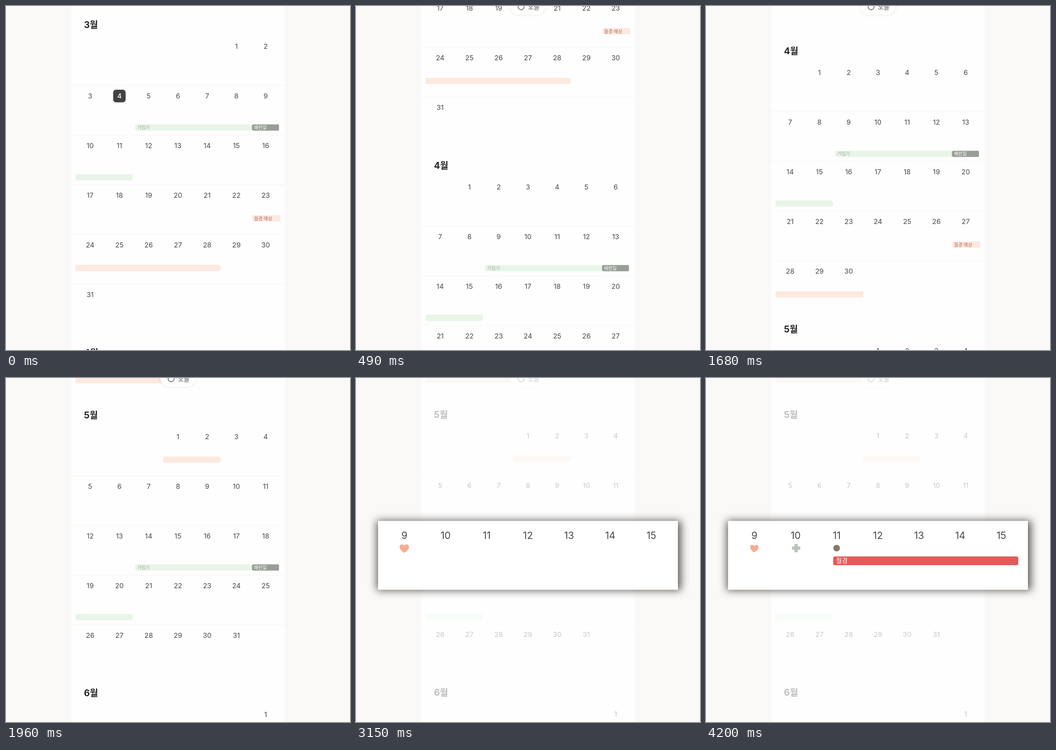
Animation of 748 by 748 pixels, one loop 5.25 s. Source, as an HTML page with a canvas:

```html
<!DOCTYPE html>
<html lang="ko">
<head>
<meta charset="utf-8">
<title>달력</title>
<style>
  html, body { margin: 0; width: 100%; height: 100%; overflow: hidden; background: #faf9f7; }
  canvas { display: block; }
</style>
</head>
<body>
<canvas id="stage" width="748" height="748"></canvas>
<script>
const SIZE = 748, LOOP = 5250, STEP = 70;
const CARD = { left: 142, width: 464 };
const COL0 = 183, COL = 63.6, ROW = 108, CENTER = 373.8;
const FONT = "Inter, 'Noto Sans CJK KR', 'Noto Sans CJK', sans-serif";
const GREEN = '#e8f5e8', PEACH = '#fde9df';

const ctx = document.getElementById('stage').getContext('2d');

// Bars hold day ranges; "open" sides run on into a neighbouring month.
const months = [
  { name: '3월', first: 5, days: 31, today: 4, fertile: [5, 11], ovulation: 9, periods: [{ from: 23, to: 28, label: true }] },
  { name: '4월', first: 1, days: 30, fertile: [9, 15], ovulation: 13, periods: [{ from: 27, to: 30, label: true, openEnd: true }] },
  { name: '5월', first: 3, days: 31, fertile: [14, 20], ovulation: 18, periods: [{ from: 1, to: 2, openStart: true }] },
  { name: '6월', first: 6, days: 30, periods: [] }
];
let nextTop = 41;
for (const m of months) {
  m.top = nextTop;
  m.weeks = Math.ceil((m.first + m.days) / 7);
  nextTop += 46.5 + (m.weeks - 1) * ROW + 126;
}

const clamp = v => Math.max(0, Math.min(1, v));
const mix = (a, b, p) => a + (b - a) * p;

// cubic-bezier(.42, 0, .58, 1)
function easeInOut(x) {
  if (x <= 0 || x >= 1) return clamp(x);
  let lo = 0, hi = 1;
  for (let i = 0; i < 24; i++) {
    const s = (lo + hi) / 2, r = 1 - s;
    if (3 * r * r * s * 0.42 + 3 * r * s * s * 0.58 + s * s * s < x) lo = s; else hi = s;
  }
  return lo * lo * (3 - 2 * lo);
}
const tween = (t, start, duration) => easeInOut((t - start) / duration);

function label(str, x, y, size, color, weight = 400, align = 'left') {
  ctx.font = `${weight} ${size}px ${FONT}`;
  ctx.textAlign = align;
  ctx.fillStyle = color;
  ctx.fillText(str, x, y + size * 0.365);
}

function box(x, y, w, h, color, radius = 0) {
  ctx.fillStyle = color;
  ctx.beginPath();
  ctx.roundRect(x, y, w, h, radius);
  ctx.fill();
}

function bar(month, from, to, y, color, openStart, openEnd) {
  const a = month.first + from - 1, b = month.first + to - 1;
  for (let week = Math.floor(a / 7); week <= Math.floor(b / 7); week++) {
    const start = Math.max(a, week * 7), end = Math.min(b, week * 7 + 6);
    const roundL = start === a && !openStart, roundR = end === b && !openEnd;
    const left = COL0 + (start % 7) * COL - (roundL ? 29.4 : 31.8);
    const right = COL0 + (end % 7) * COL + (roundR ? 29.2 : 31.8);
    const l = roundL ? 4 : 1, r = roundR ? 4 : 1;
    box(left, y + week * ROW, right - left, 13.5, color, [l, r, r, l]);
  }
}

function drawMonth(m, scroll) {
  const top = m.top - scroll;
  if (top > SIZE + 20 || top + m.weeks * ROW + 60 < 0) return;
  const y0 = top + 46.5;
  const place = day => {
    const i = m.first + day - 1;
    return [COL0 + (i % 7) * COL, y0 + Math.floor(i / 7) * ROW];
  };

  label(m.name, 169.5, top, 19.5, '#222', 700);
  for (let w = 1; w < m.weeks; w++) {
    box(CARD.left, y0 + w * ROW - 23.5, CARD.width, 1, '#f3f3f2');
  }

  if (m.fertile) {
    bar(m, ...m.fertile, y0 + 62, GREEN);
    const [fx, fy] = place(m.fertile[0]);
    label('가임기', fx - 25, fy + 69, 10, '#98a598');
    const [ox, oy] = place(m.ovulation);
    box(ox + 28.9, oy + 61, 5, 15.5, '#fefefe');
    box(ox - 29.8, oy + 62, 58.7, 13.5, '#989e97', [4, 2, 2, 4]);
    label('배란일', ox - 25.3, oy + 69, 10, '#fff', 500);
  }
  for (const p of m.periods) {
    bar(m, p.from, p.to, y0 + 43.5, PEACH, p.openStart, p.openEnd);
    if (p.label) {
      const [x, y] = place(p.from);
      label('월경 예상', x - 25.3, y + 50.5, 10, '#b8655f', 500);
    }
  }

  for (let day = 1; day <= m.days; day++) {
    const [x, y] = place(day), today = day === m.today;
    if (today) box(x - 13.5, y - 13.5, 27, 27.5, '#414141', 6);
    label(day, x, y, 15, today ? '#fff' : '#484848', today ? 500 : 400, 'center');
  }
}

function drawTodayButton() {
  ctx.save();
  ctx.shadowColor = 'rgba(0,0,0,.1)';
  ctx.shadowBlur = 7;
  box(335.5, -18, 77, 37, '#fff', 18.5);
  ctx.restore();
  ctx.strokeStyle = '#484848';
  ctx.lineWidth = 1.3;
  ctx.beginPath();
  ctx.arc(359, 1.7, 6.5, -0.25, Math.PI * 1.55);
  ctx.stroke();
  label('오늘', 374, 2, 13.5, '#484848');
}

// Icons are drawn around the origin at their resting size.
function heart() {
  ctx.beginPath();
  ctx.moveTo(0, 8.2);
  ctx.bezierCurveTo(-5, 5, -9, 1.5, -9, -3);
  ctx.bezierCurveTo(-9, -9, -2.5, -10, 0, -5.3);
  ctx.bezierCurveTo(2.5, -10, 9, -9, 9, -3);
  ctx.bezierCurveTo(9, 1.5, 5, 5, 0, 8.2);
}
function cross() {
  ctx.beginPath();
  ctx.roundRect(-3.6, -9, 7.2, 18, 1);
  ctx.roundRect(-9, -3.6, 18, 7.2, 1);
}
function dot() {
  ctx.beginPath();
  ctx.arc(0, 0, 7.2, 0, Math.PI * 2);
}
const icons = [
  { shape: heart, x: 105, y: 371, color: '#f7ad91', start: 2925 },
  { shape: cross, x: 196, y: 370, color: '#b7c4bc', start: 3345 },
  { shape: dot, x: 284, y: 370, color: '#85776e', start: 3690 }
];

function drawIcon(icon, t) {
  const age = t - icon.start;
  if (age <= 0) return;
  const grow = clamp(age / 90);
  const scale = grow < 1 ? 1.55 * grow : mix(1.55, 1, easeInOut((age - 90) / 200));
  ctx.save();
  ctx.translate(icon.x, icon.y);
  ctx.scale(scale, scale);
  ctx.fillStyle = icon.color;
  icon.shape();
  ctx.fill();
  ctx.restore();
}

function drawPanel(p) {
  const s = mix(1, 1.407, p), cy = mix(382, 385.7, p);
  const w = 463.4 * s, h = 106.5 * s;
  const left = 374 - w / 2, top = cy - h / 2;
  ctx.save();
  ctx.globalAlpha = clamp(p / 0.4);
  // The shadow is wider than the panel, so its caster sits off stage.
  ctx.save();
  ctx.shadowColor = 'rgba(35,28,25,.75)';
  ctx.shadowBlur = 17;
  ctx.shadowOffsetX = 2 * SIZE + 2;
  box(left - 5 - 2 * SIZE, top - 1, w + 10, h + 2, '#000');
  ctx.restore();
  box(left, top, w, h, '#fff');
  for (let i = 0; i < 7; i++) {
    label(9 + i, CENTER + (i - 3) * COL * s, cy - 31 * s, 15 * s, '#484848', 400, 'center');
  }
  ctx.restore();
}

function drawPeriod(p) {
  if (p <= 0) return;
  ctx.save();
  ctx.beginPath();
  ctx.roundRect(276.5, 388, 402.5 * p, 19, 3.5);
  ctx.clip();
  box(276, 387, 404, 21, '#e15b58');
  label('월경', 283, 397.5, 13.5, '#fff');
  ctx.restore();
}

function draw(t) {
  const scroll = 654 * tween(t, 318.5, 300) + 624.5 * tween(t, 1670, 300);
  const focus = tween(t, 2500, 300);

  ctx.fillStyle = '#faf9f7';
  ctx.fillRect(0, 0, SIZE, SIZE);
  box(CARD.left, 0, CARD.width, SIZE, '#fefefe');
  for (const m of months) drawMonth(m, scroll);
  if (scroll > 0) drawTodayButton();

  if (focus > 0) {
    box(CARD.left, 0, CARD.width, SIZE, `rgba(255,255,255,${0.7 * focus})`);
    drawPanel(focus);
    for (const icon of icons) drawIcon(icon, t);
    drawPeriod(tween(t, 3945, 250));
  }
}

let began;
function tick(now) {
  began ??= now;
  const t = (now - began + 0.5) % LOOP;
  draw(Math.floor(t / STEP) * STEP);
  requestAnimationFrame(tick);
}
draw(0);
requestAnimationFrame(tick);
</script>
</body>
</html>
```
